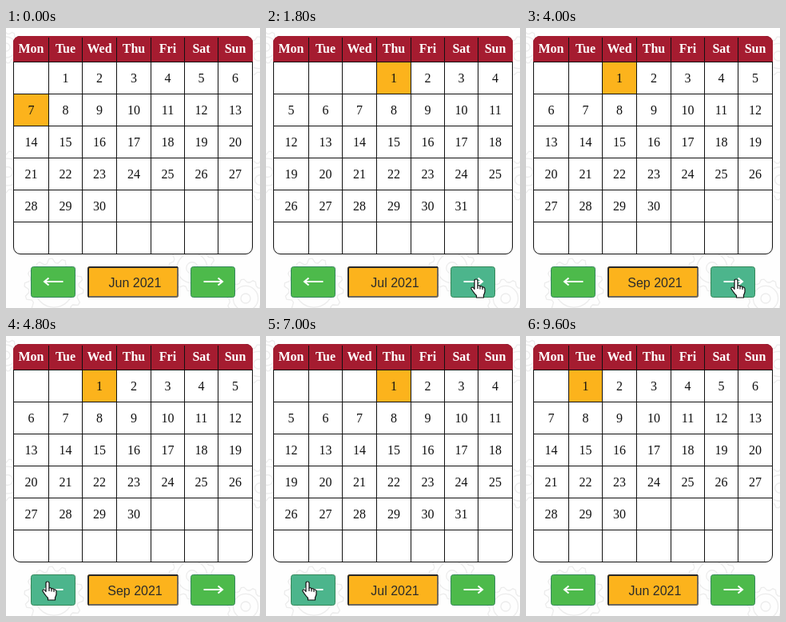
Animation of 318x350 px, one loop 10000 ms. Source, as an HTML page:

```html
<!DOCTYPE html>
<html lang="en">
<head>
<meta charset="utf-8">
<title>Calendar</title>
<style>
  html, body { margin: 0; width: 100%; height: 100%; overflow: hidden; background: #fefefe; }
  svg { display: block; }
  text { text-anchor: middle; }
  .days { font: 16px "Liberation Serif", "Times New Roman", serif; fill: #111; }
  .head { font-weight: bold; fill: #fff; }
  .label { font: 16px "Liberation Sans", Arial, sans-serif; fill: #2b2b2b; }
  .gear { fill: none; stroke: #ececec; stroke-width: 1.3; }
  .grid { fill: none; stroke: #111; }
  .arrow { fill: none; stroke: #fff; stroke-width: 2; }
  .cursor { fill: #fff; stroke: #111; stroke-width: 1.2; stroke-linejoin: round; }
</style>
</head>
<body>
<svg width="318" height="350" viewBox="0 0 318 350">
  <defs><clipPath id="card"><rect x="9" y="10" width="300" height="273" rx="9"/></clipPath></defs>
  <g id="gears" class="gear"></g>
  <g clip-path="url(#card)">
    <rect x="9" y="10" width="300" height="273" fill="#fff"/>
    <rect x="9" y="10" width="300" height="32" fill="#a51c30"/>
    <rect id="mark" height="40" fill="#fcb31c"/>
    <path id="lines" class="grid"/>
  </g>
  <rect class="grid" x="9.5" y="10.5" width="299" height="272" rx="8.5"/>
  <path d="M10 42V18.500Q10 11 18.500 11H299.500Q308 11 308 18.500V42" fill="none" stroke="#a51c30" stroke-width="2"/>
  <g id="days" class="days"></g>

  <g id="buttons"></g>
  <rect x="102" y="298" width="114" height="39" rx="3" fill="#fcb31c"/>
  <path d="M215 299V334Q215 336 213 336H104" fill="none" stroke="#6b6760" stroke-width="2"/>
  <path d="M104 336Q103 336 103 334V301Q103 299 105 299H215" fill="none" stroke="#292929" stroke-width="2"/>
  <text id="label" class="label" x="161.5" y="324"></text>

  <g id="hand" class="cursor">
    <path d="M7 1Q9 1 9 3V9Q11 8 12 10Q14 9 15 11Q18 10.500 18 13.500V17Q17.500 19 16.500 21V24H7.500V21.500Q5 19 3 16L1 13Q.5 11 2.500 11Q4 11.500 5 13.500V3Q5 1 7 1Z"/>
    <path d="M9 9V13M12 10V13.500M15 11V14" fill="none"/>
  </g>
  <path id="pointer" class="cursor" d="M0 0V16L4 12.500L6.500 18L9 17L6.500 11.500H11.500Z"/>
</svg>
<script>
const $ = id => document.getElementById(id);
const DURATION = 10000;
const colX = [9.5, 53.5, 95.5, 138.5, 181.5, 223.5, 265.5, 308.5];
const rowY = row => 42.5 + row * 40;
const dayNames = ["Mon", "Tue", "Wed", "Thu", "Fri", "Sat", "Sun"];
const monthNames = { 5: "Jun", 6: "Jul", 7: "Aug", 8: "Sep", 9: "Oct" };

// [start, month index, highlighted day]
const months = [
  [0, 5, 7], [1600, 6, 1], [3000, 7, 1], [3600, 8, 1], [4200, 9, 1],
  [4800, 8, 1], [5800, 7, 1], [6800, 6, 1], [7800, 5, 1]
];
// [start, cursor shape, x, y, hovered button]
const moves = [
  [0], [600, "pointer", 299, 330], [800, "pointer", 290, 327],
  [1000, "hand", 260, 316, "next"], [1200, "hand", 256, 313, "next"],
  [4400, "hand", 150, 311], [4600, "hand", 45, 306, "prev"],
  [9400, "pointer", 54, 339], [9600]
];
const at = (track, t) => track.filter(step => step[0] <= t).pop();

function gear(x, y, r, teeth) {
  const points = [];
  for (let i = 0; i < teeth * 4; i++) {
    const a = (i + 0.5) / (teeth * 4) * 2 * Math.PI;
    const d = i % 4 < 2 ? r : r * 0.85;
    points.push((x + d * Math.cos(a)).toFixed(1) + "," + (y + d * Math.sin(a)).toFixed(1));
  }
  return `<polygon points="${points.join(" ")}"/>` +
    [0.65, 0.25].map(k => `<circle cx="${x}" cy="${y}" r="${r * k}"/>`).join("");
}

function button(id, x, direction) {
  return `<rect id="${id}" x="${x + 0.5}" y="298.5" width="55" height="38" rx="3" stroke="#34875a"/>
    <path class="arrow" transform="translate(${x + 28.5} 317) scale(${direction} 1)"
      d="M-12 0H11M6 -4.500L11.500 0L6 4.500"/>`;
}

const cellText = (col, y, text, cls = "") =>
  `<text class="${cls}" x="${(colX[col] + colX[col + 1]) / 2}" y="${y}">${text}</text>`;

function showMonth(month, marked) {
  const offset = (new Date(2021, month, 1).getDay() + 6) % 7;
  const count = new Date(2021, month + 1, 0).getDate();
  let cells = dayNames.map((name, i) => cellText(i, 31, name, "head")).join("");
  for (let day = 1; day <= count; day++) {
    const cell = offset + day - 1, col = cell % 7, y = rowY(Math.floor(cell / 7));
    cells += cellText(col, y + 25.5, day);
    if (day === marked) {
      $("mark").setAttribute("x", colX[col]);
      $("mark").setAttribute("y", y);
      $("mark").setAttribute("width", colX[col + 1] - colX[col]);
    }
  }
  $("days").innerHTML = cells;
  $("label").textContent = monthNames[month] + " 2021";
}

$("gears").innerHTML = gear(60, 325, 37, 14) + gear(233, 300, 29, 12) + gear(300, 338, 24, 10) +
  gear(0, 24, 20, 10) + gear(2, 180, 26, 12) + gear(316, 35, 24, 11) + gear(318, 190, 25, 12);
$("lines").setAttribute("d",
  colX.slice(1, 7).map(x => `M${x} 10V283`).join("") +
  [0, 1, 2, 3, 4, 5].map(r => `M9 ${rowY(r)}H309`).join(""));
$("buttons").innerHTML = button("prev", 31, -1) + button("next", 231, 1);

let shown;
function draw(t) {
  const current = at(months, t);
  if (current !== shown) {
    shown = current;
    showMonth(current[1], current[2]);
  }
  const [, shape, x, y, hovered] = at(moves, t);
  for (const id of ["hand", "pointer"]) {
    $(id).style.display = id === shape ? "" : "none";
    if (id === shape) $(id).setAttribute("transform", `translate(${x} ${y})`);
  }
  for (const id of ["prev", "next"])
    $(id).setAttribute("fill", id === hovered ? "#4cb58c" : "#4dba4b");
}

const start = performance.now();
function tick() {
  draw((performance.now() - start) % DURATION);
  requestAnimationFrame(tick);
}
tick();
</script>
</body>
</html>
```
